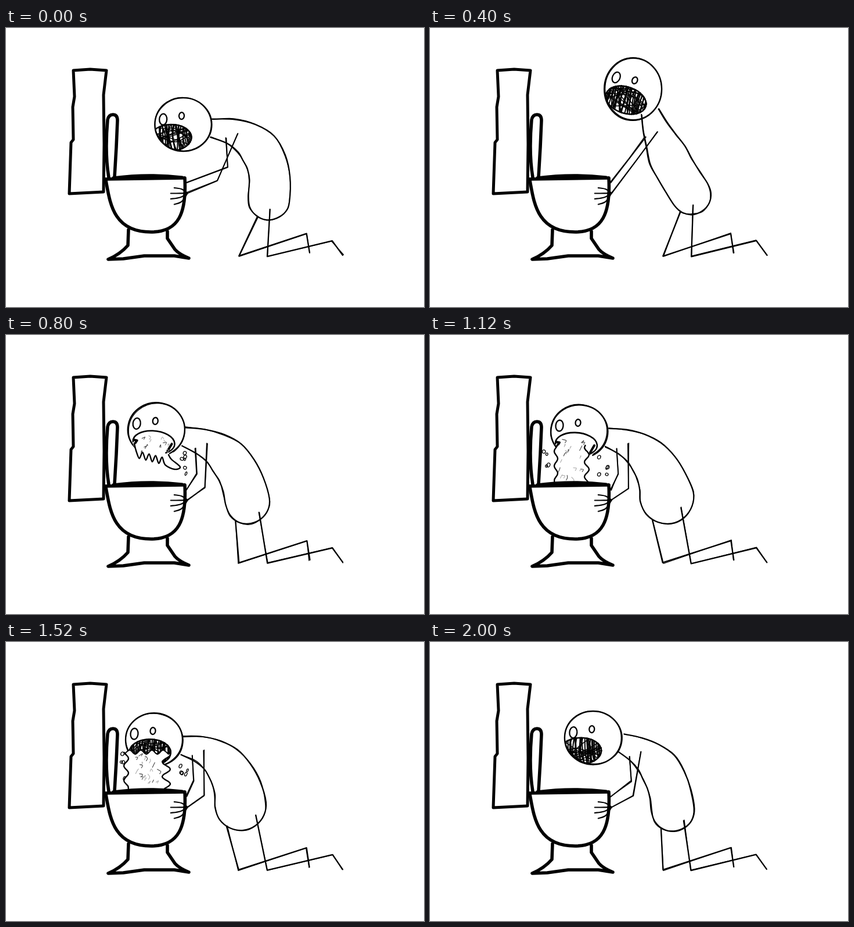
Recreate the animation shown at these times as an HTML page with a canvas. Size 720 px wide and 480 px high, loop 2.08 s.

```html
<!DOCTYPE html>
<html lang="en">
<head>
<meta charset="utf-8">
<title>Sick day</title>
<style>
  html, body { margin: 0; width: 100%; height: 100%; overflow: hidden; background: #fff; }
  svg, canvas { position: absolute; left: 0; top: 0; width: 720px; height: 480px; }
  svg { fill: none; stroke: #000; stroke-width: 5.6; stroke-linecap: round; stroke-linejoin: round; }
</style>
</head>
<body>
<canvas id="stage" width="720" height="480"></canvas>
<svg viewBox="0 0 720 480">
  <path stroke-width="5" d="M116 73L145 71L173 73L168 115L169 200L168 282L109 285L112 197L116 192L115 136L118 118Z"/>
  <path d="M177 257Q170 215 175 158Q177 149 184 149Q192 149 192 159L190 205L187 256"/>
  <path d="M171 260L307 258"/>
  <path fill="#000" stroke-width="3" d="M184 257Q245 249 304 256Z"/>
  <path d="M172 262C179 300 184 351 250 351C298 351 311 318 308 258"/>
  <path d="M211 347L210 374Q197 389 176 398L202 397L238 392L290 392L315 396Q298 389 291 381L278 362V350"/>
</svg>
<script>
const STEP = 80, LOOP = 2080, RAD = Math.PI / 180, TAU = Math.PI * 2;
const ctx = document.getElementById('stage').getContext('2d');

// tick, then: head x, y, tilt | right end of mouth | hip x, y, radius | bend of back
const keys = [
  [0, 305, 166, -2, 14, 453, 294, 36, 41],
  [5, 350, 105, 18, 30, 450, 287, 34, -6],
  [7, 350, 104, 18, 30, 450, 287, 34, -6],
  [10, 259, 163, 1, 32, 416, 287, 38, 28],
  [14, 257, 166, 0, 31, 408, 279, 46, 25],
  [19, 255, 168, 0, 29, 404, 280, 44, 29],
  [22, 253, 169, 0, 35, 399, 284, 45, 30],
  [25, 281, 165, -1, 14, 418, 289, 37, 25]
];

let seed = 1;
const rnd = () => (seed = (seed * 16807) % 2147483647) / 2147483647;
const between = (a, b) => a + (b - a) * rnd();
const jit = a => between(-a, a);
const lerp = (a, b, u) => a + (b - a) * u;
const mix = (a, b, u) => a.map((v, i) => lerp(v, b[i], u));
const range = (n, f) => Array.from({ length: n }, (_, i) => f(i));
const shake = (pts, a) => pts.map(p => p.map(v => v + jit(a)));

function poseAt(tick) {
  const i = keys.findLastIndex(k => k[0] <= tick);
  const a = keys[i], b = keys[i + 1] || a;
  const u = (tick - a[0]) / (b[0] - a[0] || 1);
  const [, x, y, tilt, mouth, hipX, hipY, hipR, bend] = mix(a, b, u * u * (3 - 2 * u));
  return { x, y, tilt, mouth, hipX, hipY, hipR, bend };
}

// smooth curve through the points
function curve(p) {
  const at = i => p[Math.max(0, Math.min(p.length - 1, i))];
  const path = new Path2D();
  path.moveTo(...p[0]);
  for (let i = 0; i < p.length - 1; i++) {
    const [a, b, c, d] = range(4, k => at(i + k - 1));
    path.bezierCurveTo(b[0] + (c[0] - a[0]) / 6, b[1] + (c[1] - a[1]) / 6,
      c[0] - (d[0] - b[0]) / 6, c[1] - (d[1] - b[1]) / 6, ...c);
  }
  return path;
}

function line(pts) {
  const path = new Path2D();
  pts.forEach(p => path.lineTo(...p));
  return path;
}

function ellipse(x, y, rx, ry, turn = 0, from = 0, to = TAU) {
  const path = new Path2D();
  path.ellipse(x, y, rx, ry, turn, from, to);
  return path;
}

function ink(path, width, color = '#000') {
  ctx.lineWidth = width;
  ctx.strokeStyle = color;
  ctx.stroke(path);
}

// one firm stroke and one loose one over it
function sketch(make, pts, width) {
  ink(make(shake(pts, .5)), width);
  ink(make(shake(pts, 1.4)), 1.4);
}

// back, rump and belly as one outline around a bent spine
function torso({ x, y, tilt, hipX, hipY, hipR, bend }) {
  const turn = (12 + 2.3 * tilt) * RAD;
  const neck = [x + 49 * Math.cos(turn), y + 49 * Math.sin(turn)], hip = [hipX, hipY];
  const dx = hipX - neck[0], dy = hipY - neck[1], len = Math.hypot(dx, dy);
  const half = mix(neck, hip, .5);
  const pull = [half[0] + 2 * bend * dy / len, half[1] - 2 * bend * dx / len];
  const spine = t => mix(mix(neck, pull, t), mix(pull, hip, t), t);
  const width = t => t < .5 ? lerp(16, 34, t * 2) : lerp(34, hipR, t * 2 - 1);
  const normal = t => {
    const [tx, ty] = mix([pull[0] - neck[0], pull[1] - neck[1]], [hipX - pull[0], hipY - pull[1]], t);
    return Math.atan2(-tx, ty);
  };
  const off = (t, turned) => {
    const [px, py] = spine(t), a = normal(t) + turned;
    return [px + width(t) * Math.cos(a), py + width(t) * Math.sin(a)];
  };
  const outline = [
    ...range(7, i => off(i / 6, 0)),
    ...range(5, i => off(1, Math.PI * (i + 1) / 6)),
    ...range(7, i => off(1 - i / 6, Math.PI))
  ];
  return { outline, shoulder: spine(.23) };
}

function drawArms([sx, sy], tilt) {
  const straight = Math.max(0, tilt / 18);
  const arm = (from, elbow, hand) =>
    sketch(line, [from, mix(elbow, mix(from, hand, .45), straight), hand], 2);
  const hand = [313, 284];
  arm([sx - 20, sy + 8], [sx - 17, 239], [311, 266]);
  arm([sx, sy], [331 + .38 * (sx - 313), 283 + .2 * (sy - 283)], hand);
  for (let i = 0; i < 4; i++) {
    const x = 283 + 3 * (i - 1.5) ** 2, y = 275 + 9.5 * i;
    ink(curve([[x, y], [lerp(x, 313, .55), lerp(y, 284, .25)], hand]), 2.1);
  }
}

function drawLegs({ hipX, hipY, hipR }) {
  sketch(line, [[hipX - .55 * hipR, hipY + .85 * hipR], [401, 392], [518, 354], [523, 387]], 2.3);
  sketch(line, [[440 + .5 * (hipX - 424), hipY + 18], [450, 393], [562, 366], [580, 391]], 2.3);
}

// dense strokes that leave a few white specks
function scribble(rx, ry) {
  for (let x = -rx - 4; x < rx + 4; x += 2.3)
    ink(curve([[x + jit(3), -ry], [x + jit(4), jit(8)], [x + 4 + jit(4), ry]]), 2);
  for (let i = 0; i < 12; i++)
    ink(curve([[-rx, jit(ry)], [jit(rx), jit(ry)], [rx, jit(ry)]]), 1.6);
}

// drawn around the head's centre
function drawFace({ tilt, mouth }, dark) {
  const ry = 46 + .4 * Math.max(0, tilt);
  const open = dark ? 0 : 1;
  const from = (90 + 56 * open) * RAD, to = (450 - 28 * open) * RAD;
  ink(ellipse(jit(.4), jit(.4), 49, ry, 0, from, to), 2.4);
  ink(ellipse(jit(1), jit(1), 49 + jit(1), ry + jit(1), jit(.2), from, to), 1.5);

  ctx.save();
  ctx.clip(ellipse(0, 0, 49, ry));
  ctx.rotate(tilt * RAD);
  ink(ellipse(-34, -10, 6.5, 9.5, .1), 2.3);
  ink(ellipse(-2, -15, 4.5, 6, .1), 2.3);
  ctx.translate(mouth - 36, 22);
  if (dark) {
    ctx.clip(ellipse(0, 0, 37, 24));
    scribble(36, 23);
    ink(ellipse(0, 0, 36, 23), 3);
  } else {
    ink(ellipse(0, 0, 36, 20, .08, Math.PI - .1, TAU + .9), 2.6);
    ink(line([[-35, -4], [-29, -3], [-33, 3]]), 4);
    ink(line([[31, 2], [24, 14]]), 4);
  }
  ctx.restore();
}

function flecks(x0, x1, y0, y1, count) {
  for (let i = 0; i < count; i++) {
    const x = between(x0, x1), y = between(y0, y1), dx = jit(5), dy = jit(5);
    ink(curve([[x, y], [x + dx + 2, y + dy], [x + dx, y + dy + 4]]), 1.1, i % 2 ? '#444' : '#aaa');
  }
}

function drops(count, x0, x1, y0, y1) {
  for (let i = 0; i < count; i++)
    ink(ellipse(between(x0, x1), between(y0, y1), between(1.3, 3), between(2, 3.6), .4), 1.3);
}

// dripping tongues with a longer one on the right, around the head's centre
function drawDrool(grow) {
  const tongues = range(10, i => [-35 + 5.6 * i, 40 + 1.4 * i + (i % 2 ? 8 : -4)]);
  const pts = [[-38, 24], ...tongues, [31, 68], [41, 64], [26, 51], [21, 43]]
    .map(([x, y]) => [x, 24 + (y - 24) * grow]);
  ctx.fill(curve(pts));
  ink(curve(pts), 2.4);
  flecks(-28, 20, 10, 38, 12);
  if (grow >= 1) drops(6, 41, 56, 38, 76);
}

function drawStream(tick) {
  const u = Math.max(0, Math.min(1, (tick - 14) / 5));
  const flow = 1.9 * (tick - 19), top = tick > 19 ? 190 + 22 * (tick - 19) : 190;
  const n = Math.round((252 - top) / 4);
  const edge = (x, sign, y0, amp) => range(n + 1, i => {
    const y = lerp(top, 252, i / n);
    return [x + sign * amp * Math.cos((y - y0) / 4 - flow), y];
  });
  const left = edge(217 - 10 * u, -1, 213, 3 + u), right = edge(270 + 6 * u, 1, 219, 4 + 3 * u);
  const lip = range(9, i => [lerp(left[0][0], right[0][0], i / 8), top + (i % 2 ? -4 : 3)]);
  const lipped = tick > 16;
  ctx.fill(line([...(lipped ? lip : []), ...right, ...left.reverse()]));
  ink(curve(left), 2.4);
  ink(curve(right), 2.4);
  if (lipped) ink(curve(lip), 2);
  flecks(222, 262, lipped ? top + 6 : 178, 246, Math.round(n * 1.2));
  drops(4, 195, 206, 190, 242);
  drops(5, 290, 313, 208, 240);
}

// splashes thrown up and to the left
function drawSplash(s) {
  for (let i = 0; i < 3; i++)
    ink(ellipse(205 - 130 * s, 200 - (110 - 45 * i) * Math.sin(Math.PI * s), 2, 2.6), 1.2);
}

function drawDrips(fall) {
  for (let i = 0; i < 3; i++) {
    const y = 236 + 5 * (i % 2) + 9 * fall;
    if (y < 250) ink(ellipse(220 + 17.5 * i, y, 3, 6, .2), 1.4);
  }
  if (!fall) ink(line([[263, 214], [264, 196], [267, 196], [268, 223]]), 1.8);
}

function draw(tick) {
  const pose = poseAt(tick), { outline, shoulder } = torso(pose);
  seed = 911 + tick * 7717;
  ctx.fillStyle = '#fff';
  ctx.fillRect(0, 0, 720, 480);
  ctx.lineCap = ctx.lineJoin = 'round';

  sketch(curve, outline, 2.2);
  drawLegs(pose);
  drawArms(shoulder, pose.tilt);

  ctx.save();
  ctx.translate(pose.x, pose.y);
  drawFace(pose, tick < 9 || tick > 16);
  if (tick > 8 && tick < 12) drawDrool(1 + .4 * (tick - 10));
  ctx.restore();

  if (tick > 11 && tick < 22) drawStream(tick);
  if (tick > 14 && tick < 19) drawSplash((tick - 14) / 4.4);
  if (tick > 21 && tick < 25) drawDrips(tick - 22);
}

let shown = -1;
function loop() {
  const tick = Math.floor(performance.now() % LOOP / STEP);
  if (tick !== shown) draw(shown = tick);
  requestAnimationFrame(loop);
}
loop();
</script>
</body>
</html>
```
